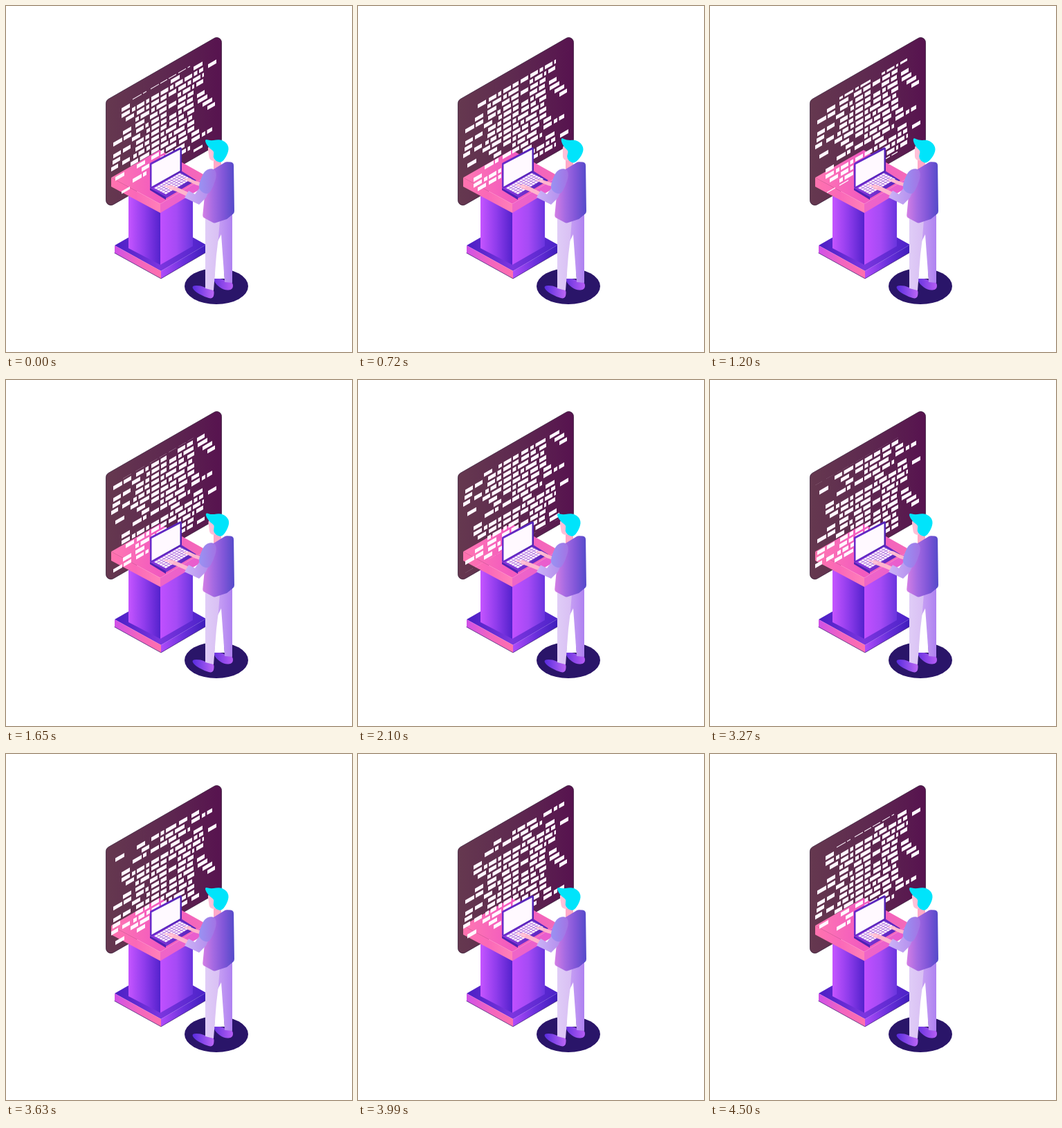
Write an HTML page with a canvas that moves like this. It is 500 by 500 pixels and loops after 4560 ms.

```html
<!DOCTYPE html>
<html lang="en">
<head>
<meta charset="utf-8">
<title>Coder at a desk</title>
<style>
html, body { margin: 0; width: 100%; height: 100%; overflow: hidden; background: #fff; }
canvas { display: block; width: 500px; height: 500px; }
</style>
</head>
<body>
<canvas id="stage" width="500" height="500"></canvas>
<script>
const ctx = document.getElementById('stage').getContext('2d');
const LOOP = 4560, TRAVEL = 4500;
const SLOPE = Math.tan(Math.PI / 6);
const ROW_GAP = 120 / 14, FIRST_ROW = 247, BAR_HEIGHT = 5.6;
const WINDOW = { top: 240, bottom: 368 };

// Each row of code is a set of horizontal runs, split into words below.
const rows = [
  [[167, 179], [238, 251], [271, 284]],
  [[167, 179], [182, 187], [189, 207], [210, 285], [292, 304]],
  [[173, 185], [189, 207], [210, 232], [235, 246], [249, 286]],
  [[187, 207], [210, 232], [248, 272], [275, 285]],
  [[169, 181], [187, 200], [208, 232], [235, 246], [249, 271]],
  [[155, 168], [170, 181], [188, 206], [210, 232], [248, 270], [276, 287]],
  [[182, 194], [203, 232], [236, 246], [249, 271], [277, 291]],
  [[155, 166], [169, 180], [188, 207], [210, 232], [236, 257], [262, 272], [284, 298]],
  [[154, 165], [187, 207], [210, 246], [250, 269], [291, 302]],
  [[152, 162], [168, 179], [184, 200], [203, 232], [235, 258], [262, 272]],
  [[180, 207], [210, 246], [249, 272]],
  [[158, 171], [189, 201], [210, 246], [250, 262], [268, 279]],
  [[196, 207], [223, 258], [268, 280], [283, 298]],
  [[183, 196], [198, 203], [209, 221], [223, 233], [235, 246], [249, 266]]
];

const ramp = (x0, y0, x1, y1, ...colors) => {
  const g = ctx.createLinearGradient(x0, y0, x1, y1);
  colors.forEach((c, i) => g.addColorStop(i / (colors.length - 1), c));
  return g;
};
const across = (x0, x1, ...colors) => ramp(x0, 0, x1, 0, ...colors);

function trace(points) {
  ctx.beginPath();
  points.forEach(([x, y], i) => i ? ctx.lineTo(x, y) : ctx.moveTo(x, y));
  ctx.closePath();
}

function poly(fill, ...points) {
  trace(points);
  ctx.fillStyle = fill;
  ctx.fill();
}

// Closed shape whose corners are softened by the given radius.
function rounded(fill, radius, ...points) {
  const n = points.length, last = points[n - 1];
  ctx.beginPath();
  ctx.moveTo((last[0] + points[0][0]) / 2, (last[1] + points[0][1]) / 2);
  points.forEach((p, i) => ctx.arcTo(...p, ...points[(i + 1) % n], radius));
  ctx.closePath();
  ctx.fillStyle = fill;
  ctx.fill();
}

function blob(fill, ...points) {
  const n = points.length;
  const mid = i => [0, 1].map(k => (points[i % n][k] + points[(i + 1) % n][k]) / 2);
  ctx.beginPath();
  ctx.moveTo(...mid(n - 1));
  points.forEach((p, i) => ctx.quadraticCurveTo(...p, ...mid(i)));
  ctx.closePath();
  ctx.fillStyle = fill;
  ctx.fill();
}

function line(color, width, ...points) {
  ctx.beginPath();
  points.forEach(([x, y], i) => i ? ctx.lineTo(x, y) : ctx.moveTo(x, y));
  ctx.strokeStyle = color;
  ctx.lineWidth = width;
  ctx.lineCap = ctx.lineJoin = 'round';
  ctx.stroke();
}

const smooth = x => {
  x = Math.min(1, Math.max(0, x));
  return x * x * (3 - 2 * x);
};

function drawScreen() {
  rounded(across(145, 311, '#65384f', '#5e2950', '#57134f'), 7,
    [144.5, 136.5], [311.5, 40.5], [311.5, 197], [144.5, 293]);
  ctx.strokeStyle = '#2b1230';
  ctx.lineWidth = 0.7;
  ctx.stroke();
}

function drawWords(start, end, row) {
  const small = 5, large = 11, gap = 2.5;
  let x = start, n = row;
  while (x < end - 2) {
    const size = end - start < 15 ? end - start : n++ % 3 ? large : small;
    const stop = end - x - size < 5 ? end : x + size;
    ctx.fillRect(x, -BAR_HEIGHT / 2, stop - x, BAR_HEIGHT);
    x = stop + gap;
  }
}

function drawCode(shift) {
  ctx.save();
  ctx.transform(1, -SLOPE, 0, 1, 0, 0);
  ctx.beginPath();
  ctx.rect(145, WINDOW.top, 166, WINDOW.bottom - WINDOW.top);
  ctx.clip();
  ctx.fillStyle = '#fff7ff';
  for (let copy = 0; copy < 3; copy++) {
    rows.forEach((runs, i) => {
      const y = FIRST_ROW + i * ROW_GAP + (copy - 1) * 120 - shift;
      if (y < WINDOW.top - 5 || y > WINDOW.bottom + 5) return;
      ctx.save();
      ctx.translate(0, y);
      runs.forEach(([a, b]) => drawWords(a, b, i));
      ctx.restore();
    });
  }
  ctx.restore();
}

function drawDesk() {
  poly(across(157, 289, '#4a1fc4', '#7c35df', '#4a22c8'), [157, 346], [223, 308], [289, 345], [224, 383]);
  poly(across(157, 224, '#cf50e8', '#f264c0', '#ff70ad'), [157, 346], [224, 383], [224, 394], [157, 357]);
  poly(across(224, 289, '#b04cfa', '#6a30dc', '#3d1cba'), [224, 383], [289, 345], [289, 356], [224, 394]);
  line('#32146f', 0.7, [157, 357], [224, 394], [289, 356]);
  poly(across(177, 223, '#c555ff', '#8f3cec', '#5422cd'), [177, 270], [223, 296], [223, 374], [177, 350]);
  poly(across(223, 270, '#c050ff', '#a54af5', '#6a35de'), [223, 296], [270, 270], [270, 347], [223, 374]);
  poly(across(152, 289, '#ff78b2', '#f25abf', '#f46bb9'), [152, 248], [222, 208], [290, 246], [223, 286]);
  poly(across(152, 223, '#ff73ae', '#fa68b8', '#ff80b9'), [152, 248], [223, 286], [223, 299], [152, 261]);
  poly(across(223, 290, '#ef65c7', '#e75bd0'), [223, 286], [290, 246], [290, 259], [223, 299]);
}

function drawLaptop() {
  poly(across(209, 274, '#8a38dd', '#5425bd'), [208, 263], [253, 238], [275, 252], [231, 278]);
  poly('#4e20b5', [208, 263], [231, 276], [231, 280], [208, 266]);
  poly('#fff2ff', [214, 263], [251, 241.5], [268, 250], [231, 272]);
  for (let i = 1; i < 5; i++) {
    const k = i / 5;
    line('#a163d7', 0.8, [214 + 17 * k, 263 + 9 * k], [251 + 17 * k, 241.5 + 8.5 * k]);
  }
  for (let i = 1; i < 10; i++) {
    const k = i / 10;
    line('#a163d7', 0.8, [214 + 37 * k, 263 - 21.5 * k], [231 + 37 * k, 272 - 22 * k]);
  }
  rounded(across(208, 254, '#6b2bcc', '#5123b4'), 2, [208, 227], [254, 203], [254, 239], [208, 265]);
  poly('#fff9ff', [210.5, 229], [251.5, 207.5], [251.5, 238], [210.5, 261]);
}

function drawLegs() {
  ctx.beginPath();
  ctx.ellipse(304, 405, 46, 26, 0, 0, Math.PI * 2);
  ctx.fillStyle = '#2a1569';
  ctx.fill();
  blob(across(301, 327, '#6a35df', '#b45cf5'),
    [299, 393], [312, 394], [318, 398], [328, 399], [328, 410], [315, 411], [303, 402]);
  blob(across(271, 300, '#5c2ee0', '#bb66f5'),
    [268, 404], [282, 404], [289, 408], [301, 408], [300, 424], [286, 420], [272, 412]);
  poly('#fff', [303, 340], [311, 328], [316, 394], [301, 394]);
  poly(across(305, 328, '#c9a2f4', '#ad80f0'), [304, 306], [327, 300], [327, 400], [316, 399], [311, 330], [305, 342]);
  poly(across(287, 307, '#e0cdf7', '#d9c0f4'), [288, 303], [309, 308], [307, 335], [304, 360], [300, 411], [288, 408]);
}

function drawHead(turn) {
  poly('#ffa9c8', [300, 219], [311, 223], [311, 234], [300, 238]);
  ctx.save();
  ctx.translate(305, 224);
  ctx.rotate(0.14 * turn);
  ctx.translate(-305 + turn * 1.5, -224);
  blob('#ffc0d8', [291, 202], [302, 201], [305, 218], [302, 225], [294, 222], [293, 214]);
  blob('#00e4fb', [288, 192], [296, 195], [311, 192], [322, 201], [321, 213],
    [312, 227], [303, 224], [299, 218], [301, 210], [294, 206], [288, 197]);
  ctx.restore();
}

function drawBody(typing) {
  const far = typing * 1.5, near = -typing * 1.2;
  line('#ffb4cd', 5, [289, 260], [275, 256 + far / 2], [264, 251 + far]);
  line('#ffc5d8', 2.2, [267, 252 + far], [258, 250 + far]);
  rounded(across(284, 330, '#d47fe5', '#a56ae2', '#8056d8', '#544ac9'), 5,
    [300, 236], [318, 225], [329, 226], [330, 299], [319, 308], [301, 314], [284, 305], [287, 274], [288, 246]);
  line('#ffb4cd', 6, [262, 272 + near / 2], [249, 266 + near], [238, 262 + near]);
  line('#ffc7da', 2.5, [241, 263 + near], [230, 260 + near]);
  poly(across(260, 290, '#cbb1f6', '#b591ee'),
    [264, 267 + near / 3], [273, 272], [281, 261], [295, 263], [289, 277], [279, 287], [258, 277 + near / 3]);
  blob(across(280, 304, '#9a92f2', '#a273e4'),
    [288, 237], [300, 234], [305, 243], [300, 260], [292, 274], [277, 265], [282, 248]);
}

function frame(now) {
  const t = now % LOOP;
  const shift = 120 * Math.min(1, t / TRAVEL);
  const turn = smooth((t - 250) / 350) - smooth((t - 1350) / 400);
  const typing = Math.sin(Math.min(t, TRAVEL) / TRAVEL * Math.PI * 16);
  ctx.fillStyle = '#fff';
  ctx.fillRect(0, 0, 500, 500);
  drawScreen();
  drawDesk();
  drawCode(shift);
  drawLaptop();
  drawLegs();
  drawHead(turn);
  drawBody(typing);
}

const began = performance.now();
function play() {
  frame(performance.now() - began);
  requestAnimationFrame(play);
}
play();
</script>
</body>
</html>
```
